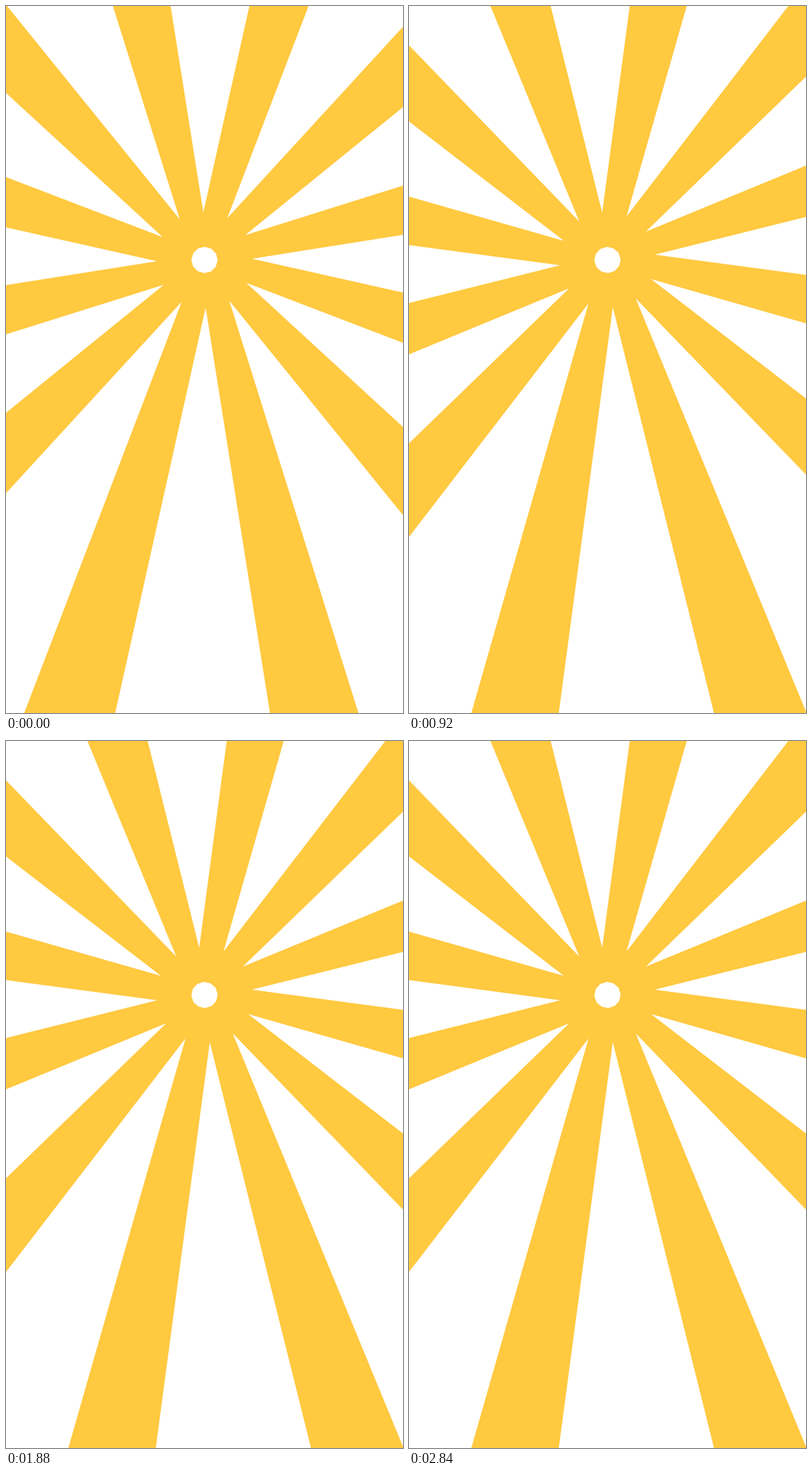
Recreate the animation shown at these times as an HTML page with a canvas. Size 561 by 998 pixels, loop 2.88 s.

```html
<!DOCTYPE html>
<html lang="en">
<head>
<meta charset="utf-8">
<title>Sunburst</title>
<style>
  html, body { margin: 0; width: 100%; height: 100%; overflow: hidden; background: #fff; }
  canvas { display: block; width: 561px; height: 998px; }
</style>
</head>
<body>
<canvas id="stage" width="561" height="998"></canvas>
<script>
const ctx = document.getElementById('stage').getContext('2d');
const RAYS = 12, STEP_MS = 40, STEPS = 72;
const CENTER = { x: 280.5, y: 358.5 };
const GOLD = '#ffc940';

// Angles in degrees, clockwise from straight up
const GAP = { tipRadius: 67.25, tipAngle: -1.39, left: -9.02, right: 12.59 };
const HUB = { radius: 18.6, angle: 1.78 };

function polar(radius, degrees, from = { x: 0, y: 0 }) {
  const a = degrees * Math.PI / 180;
  return { x: from.x + radius * Math.sin(a), y: from.y - radius * Math.cos(a) };
}

function fillShape(points) {
  ctx.beginPath();
  points.forEach(p => ctx.lineTo(p.x, p.y));
  ctx.closePath();
  ctx.fill();
}

function draw(turn) {
  ctx.fillStyle = GOLD;
  ctx.fillRect(0, 0, 561, 998);
  ctx.fillStyle = '#fff';
  const hub = [];
  for (let i = 0; i < RAYS; i++) {
    const a = turn + i * 360 / RAYS;
    const tip = polar(GAP.tipRadius, a + GAP.tipAngle, CENTER);
    fillShape([tip, polar(1500, a + GAP.left, tip), polar(1500, a + GAP.right, tip)]);
    hub.push(polar(HUB.radius, a + HUB.angle, CENTER));
  }
  fillShape(hub);
}

const start = performance.now();

function tick() {
  const elapsed = Math.max(0, performance.now() - start);
  const step = Math.floor(elapsed / STEP_MS) % STEPS;
  draw(step * 360 / STEPS);
  requestAnimationFrame(tick);
}

tick();
</script>
</body>
</html>
```
